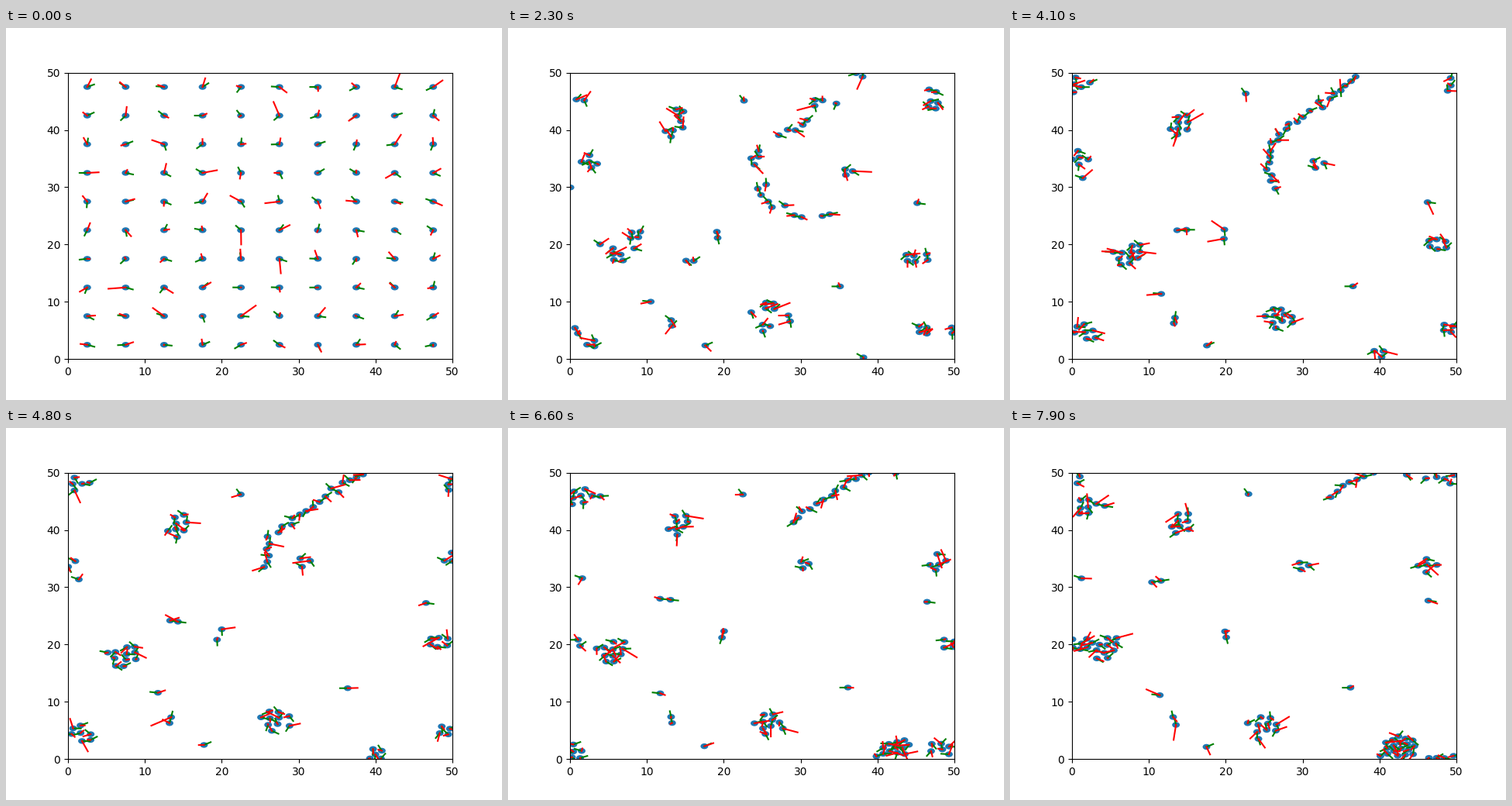
Animation, 640 px wide and 480 px high, one loop 8 s. Source, as a matplotlib script:

```python
from itertools import combinations

import matplotlib.pyplot as plt
import numpy as np
from matplotlib.animation import FuncAnimation
from matplotlib.collections import EllipseCollection, LineCollection

BOX, FRAMES = 50, 80
MEET = 12          # first pairs have met, groups start to travel
MERGED = 36        # groups have closed up
rng = np.random.default_rng(4)
frames = np.arange(FRAMES)

# Particles that never meet anyone
LONERS = [(22.5, 47.5), (2.5, 32.5), (12.5, 12.5), (17.5, 2.5), (37.5, 12.5), (47.5, 27.5)]

# Group size, then the places its centre passes at an even pace
GROUPS = [
    (2, (20.2, 22.5), (20.5, 22.2)),
    (2, (17.5, 16.5), (11.6, 32)),
    (2, (14, 7.5), (13.7, 7.3)),
    (8, (12.8, 42.5), (14.2, 41.2), (13.9, 41.5)),
    (5, (5, 36.5), (-3.3, 34.8)),
    (11, (7, 20.5), (7.5, 18), (4.3, 19.4)),
    (6, (45.6, 18), (48.6, 21), (52, 20.8)),
    (11, (-.5, 5), (1.2, 5.5), (-1.2, -.3)),
    (8, (-3, 45.5), (.4, 49), (2, 44.8)),
    (10, (25.8, 10), (27.2, 7.8), (25, 6.5)),
    (3, (38.3, 32.4), (30.7, 34.7), (30, 34.1)),
    (3, (38, 3), (43.5, 2.3)),
]

# A chain that slides along a rail and piles up at its end
RAIL = np.array([(40, 26), (31, 26.3), (27, 28.5), (25.5, 33), (26.3, 38.5),
                 (30, 42.5), (33.5, 45.5), (36.3, 48.5), (43, 52.4)])
BEADS, SPEED = 23, .517


def wrap(d):
    return d - BOX * np.round(d / BOX)


def smooth(t):
    t = np.clip(t, 0, 1)
    return t * t * (3 - 2 * t)


def along(s, knots, pts):
    pts = np.array(pts, float)
    return np.column_stack([np.interp(s, knots, pts[:, k]) for k in (0, 1)])


def build_anchors():
    anchors, ids = [], []
    rows = [(1, p) for p in LONERS] + GROUPS
    for g, (size, *stops) in enumerate(rows):
        path = along(frames, np.linspace(MEET, FRAMES - 1, len(stops)), stops)
        anchors += [path] * size
        ids += [g] * size
    arc = np.r_[0, np.cumsum(np.hypot(*np.diff(RAIL, axis=0).T))]
    tail = SPEED * np.clip(frames - MEET, 0, None)
    gap = 1.5 - .4 * np.clip((frames - MEET) / 29, 0, 1)
    for k in range(BEADS):
        anchors.append(along(tail + k * gap, arc, RAIL))
        ids.append(len(rows))
    return np.stack(anchors, axis=1), np.array(ids)


def assign(cost):
    """Swap partners until the total cost of all trips stops falling."""
    pick = list(range(len(cost)))
    for _ in range(15):
        for i, j in combinations(range(len(cost)), 2):
            a, b = pick[i], pick[j]
            if cost[i][a] + cost[j][b] > cost[i][b] + cost[j][a]:
                pick[i], pick[j] = b, a
    return pick


def neighbours(pos):
    d = wrap(pos[:, None] - pos[None])
    r = np.hypot(d[..., 0], d[..., 1]) + 1e-6
    np.fill_diagonal(r, 99)
    return d, r


def attract(pos):
    """Short-range pull towards members of the same group."""
    d, r = neighbours(pos)
    pull = np.where(same & (r > 1.05), 40 / r ** 5, 0)
    step = -(d * pull[..., None]).sum(1)
    size = np.hypot(step[:, 0], step[:, 1])[:, None]
    return step * np.minimum(1, .3 / (size + 1e-9))


def separate(pos):
    for _ in range(8):
        d, r = neighbours(pos)
        push = .45 * np.clip(1 - r, 0, None) / r
        pos = pos + (d * push[..., None]).sum(1)
    return pos


def unit(ang):
    return np.column_stack([np.cos(ang), np.sin(ang)])


def turn(pos, ang):
    """Rotate each heading into the dipole field of its close neighbours."""
    u = unit(ang)
    d, r = neighbours(pos)
    n = d / r[..., None]
    proj = (n * u[None]).sum(-1)
    near = np.where(r < 1.7, r ** -3, 0)
    field = ((3 * proj[..., None] * n - u[None]) * near[..., None]).sum(1)
    torque = u[:, 0] * field[:, 1] - u[:, 1] * field[:, 0]
    return ang + np.clip(.25 * torque, -.5, .5)


axis = np.arange(2.5, BOX, 5)
grid = np.array([(x, y) for y in axis for x in axis])
anchors, ids = build_anchors()
pick = assign((wrap(grid[:, None] - anchors[MEET][None]) ** 2).sum(-1).tolist())
anchors, ids = anchors[:, pick], ids[pick]
same = ids[:, None] == ids[None]

# Each place in the group shrinks towards the anchor; chain beads reach it
offset = wrap(grid - anchors[0])
rest = np.where(ids == ids.max(), 0, .22)
spread = 1 - (1 - rest) * smooth(frames / MERGED)[:, None]
goals = anchors + offset * spread[..., None]


def simulate():
    pos = goals[0]
    ang = rng.uniform(0, 2 * np.pi, len(pos))
    out = []
    for n in range(FRAMES):
        kick = rng.normal(0, .85, pos.shape)
        out.append((pos % BOX, ang, kick))
        drift = goals[min(n + 1, FRAMES - 1)] - goals[n] + .1 * (goals[n] - pos)
        lure = attract(pos) * (1 - smooth(n / MERGED))
        pos = separate(pos + drift + lure + .1 * kick)
        ang = turn(pos, ang)
    return out


states = simulate()

fig, ax = plt.subplots(figsize=(6.4, 4.8), dpi=100)
ax.set(xlim=(0, BOX), ylim=(0, BOX))
ones = np.ones(len(grid))
discs = EllipseCollection(ones, ones, 0 * ones, units="xy", offsets=grid,
                          offset_transform=ax.transData, facecolors="C0",
                          edgecolors="none")
aims, kicks = [LineCollection([], colors=c, linewidths=1.5, capstyle="projecting", zorder=z)
               for c, z in (("g", 2), ("r", 2.1))]
for art in (discs, aims, kicks):
    ax.add_collection(art, autolim=False)


def update(n):
    pos, ang, kick = states[n]
    discs.set_offsets(pos)
    aims.set_segments(np.stack([pos, pos + unit(ang)], axis=1))
    kicks.set_segments(np.stack([pos, pos + kick], axis=1))
    return discs, aims, kicks


anim = FuncAnimation(fig, update, frames=FRAMES, interval=100, repeat=True, repeat_delay=0)
plt.show()
```
